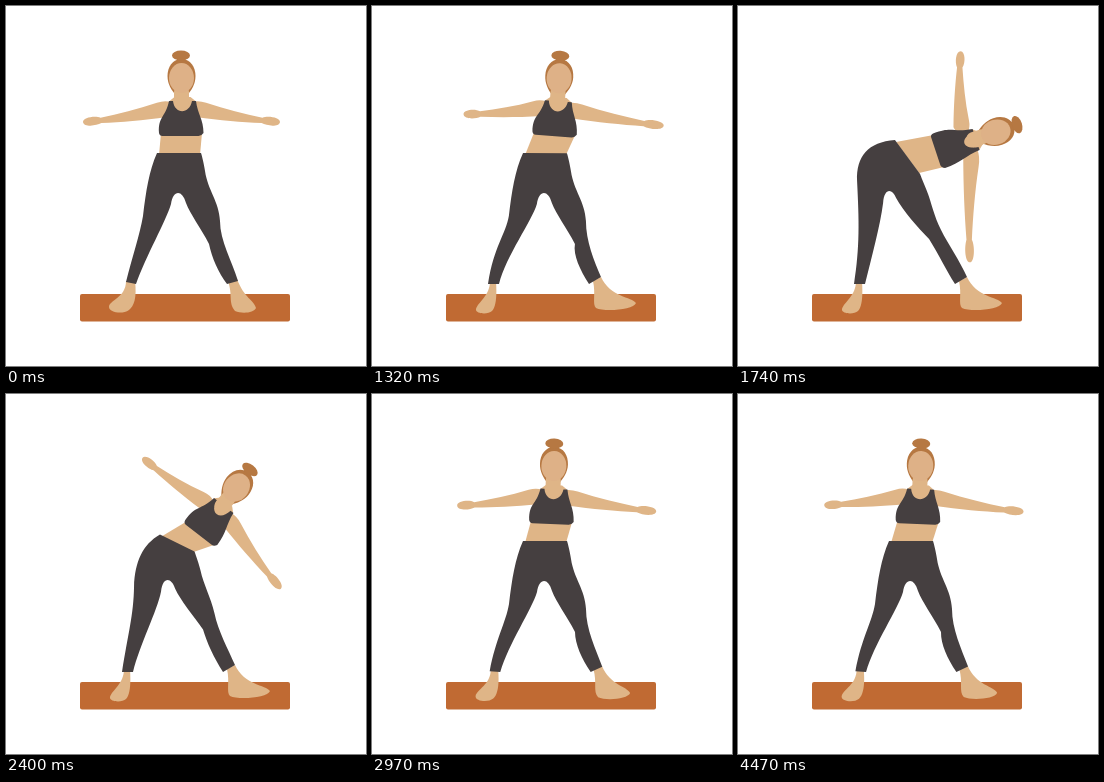
An HTML page that plays this animation: 360 by 360 pixels, repeating every 4500 ms.

```html
<!DOCTYPE html>
<html lang="en">
<head>
<meta charset="utf-8">
<title>Triangle pose</title>
<style>
  html, body { margin: 0; width: 100%; height: 100%; overflow: hidden; background: #fff; }
  svg { display: block; width: 100vw; height: 100vh; }
  .skin { fill: #dfb587; }
  .dark { fill: #453f40; }
  .hair { fill: #b67842; }
  .face { fill: #deb187; }
</style>
</head>
<body>
<svg viewBox="0 0 360 360">
  <defs>
    <path id="arm" d="M-6 -6Q0 -9 8 -7.5C28 -4 48 -2.5 66 -1.6C71 -5 84 -4.5 84 0C84 5 72 6 66 3.8C46 6 25 7.5 0 8Q-7 6 -6 -6Z"/>
  </defs>
  <rect x="74" y="288" width="210" height="27.6" rx="2" fill="#c06a33"/>
  <path id="footL" class="skin"/>
  <path id="footR" class="skin"/>
  <path id="waist" class="skin"/>
  <path id="pants" class="dark"/>
  <g id="torso">
    <use id="armL" href="#arm" class="skin"/>
    <use id="armR" href="#arm" class="skin"/>
    <g id="top">
      <path class="skin" d="M-12 -35L-7 -39H9L14 -35L8 -20H-8Z"/>
      <path class="dark" d="M-22.5 -3C-23.5 -20 -16 -18 -12.5 -35H-8.5C-7 -21.5 8 -21.5 10.5 -35H14.5C16 -22 22 -17 22 -3Q20 0 17 0H-19Q-22 0 -22.5 -3Z"/>
    </g>
    <g id="head">
      <path class="hair" d="M0 -19C9 -19 14 -11 14 -2C14 6 10 12 6 17H-6C-10 12 -14 6 -14 -2C-14 -11 -9 -19 0 -19Z"/>
      <path class="hair" d="M-4 -22H3L5 -15H-5Z"/>
      <ellipse class="hair" cx="-.5" cy="-22.5" rx="9" ry="5"/>
      <rect class="skin" x="-7.5" y="8" width="15" height="22" rx="6"/>
      <ellipse class="face" rx="12.5" ry="15"/>
    </g>
  </g>
</svg>
<script>
const LOOP = 4500, CYCLE = 3600, RAD = Math.PI / 180;
const $ = id => document.getElementById(id);
const mix = (a, b, k) => a + (b - a) * k;
const setPath = (id, d) => $(id).setAttribute('d', d);
const setMove = (id, move) => $(id).setAttribute('transform', move);

// Each outline at both ends of its movement
const pants = [
  'M151 147C143 165 140 185 137 210C134 228 126 252 120 276L130 278C140 250 160 215 165 198C167 184 176 183 180 197C184 208 195 222 203 238C206 252 212 266 221 278L232 275C226 255 214 235 214 215C213 195 202 185 199 165C198 158 196 150 195 147Z',
  'M157 134C130 136 118 150 119 175C121 215 122 240 116 278L127 278C134 250 142 220 145 197C146 182 154 182 158 192C165 205 180 222 191 233C201 249 208 264 217 278L229 271C222 255 210 238 203 224C196 210 193 196 190 188C188 182 184 174 182 168Z'
];
const footL = [
  'M120 275C120 292 103 294 103 301C103 306 116 309 123 304C128 300 131 292 129 275Z',
  'M118 275C118 290 106 296 104 303C103 308 116 309 120 305C124 301 125 290 124 275Z'
];
const footR = [
  'M222 275C227 290 222 296 229 305C236 308 248 307 250 302C248 294 238 292 231 273Z',
  'M221 275C224 288 220 298 224 302C232 306 262 304 264 297C260 291 238 291 229 271Z'
];

function morph([from, to], amount) {
  const ends = to.match(/\d+/g).map(Number);
  let i = 0;
  return from.replace(/(\d+) (\d+)/g, (_, x, y) => {
    const k = amount(+y);
    return `${mix(+x, ends[i++], k)} ${mix(+y, ends[i++], k)}`;
  });
}

function ramp(t, from, to) {
  const u = Math.min(1, Math.max(0, (t - from) / (to - from)));
  return u * u * (3 - 2 * u);
}

function draw(time) {
  const t = time % LOOP % CYCLE;
  const step = ramp(t, 400, 1180) - ramp(t, 2680, 3330);
  const bend = ramp(t, 1300, 1760) - ramp(t, 2080, 2720);
  const swing = Math.sin(bend * Math.PI / 2);

  // Torso hangs on the middle of the top's hem
  const x = 175.5 + 7 * step + 15.5 * swing;
  const y = 130 + 16 * swing;
  const tilt = 4 * step + 68 * bend;
  const wide = 1 - .18 * bend, tall = 1 + .2 * bend;
  setMove('torso', `translate(${x} ${y}) rotate(${tilt})`);
  setMove('top', `scale(${wide} ${tall})`);
  setMove('head', `translate(0 ${-58 - 5 * bend})`);

  const arm = (id, side, angle, length) =>
    setMove(id, `translate(${15.5 * side} ${-27 - 5 * bend}) rotate(${angle}) scale(${length / 84} ${side})`);
  arm('armL', -1, 171 + 27 * bend * bend, 84 - 6 * step - 2 * bend);
  arm('armR', 1, 9 - 4 * step + 14 * swing, 84 + 9 * step + 13 * bend - 15 * Math.sin(bend * Math.PI));

  // Bare waist joins the pants to the hem
  const c = Math.cos(tilt * RAD), s = Math.sin(tilt * RAD);
  const hem = side => {
    const w = side * 20.5 * wide;
    return `${x + w * c + 3 * s} ${y + w * s - 3 * c}`;
  };
  const belt = (x0, y0, x1, y1) => `${mix(x0, x1, bend)} ${mix(y0, y1, bend)}`;
  setPath('waist', `M${hem(-1)}L${belt(153, 149, 158, 136)}L${belt(194, 149, 181, 167)}L${hem(1)}Z`);

  // Hips follow the bend, cuffs follow the feet
  setPath('pants', morph(pants, py => py > 240 ? step : bend));
  setPath('footL', morph(footL, () => step));
  setPath('footR', morph(footR, () => step));
}

const start = performance.now();
function tick() {
  draw(performance.now() - start);
  requestAnimationFrame(tick);
}
tick();
</script>
</body>
</html>
```
